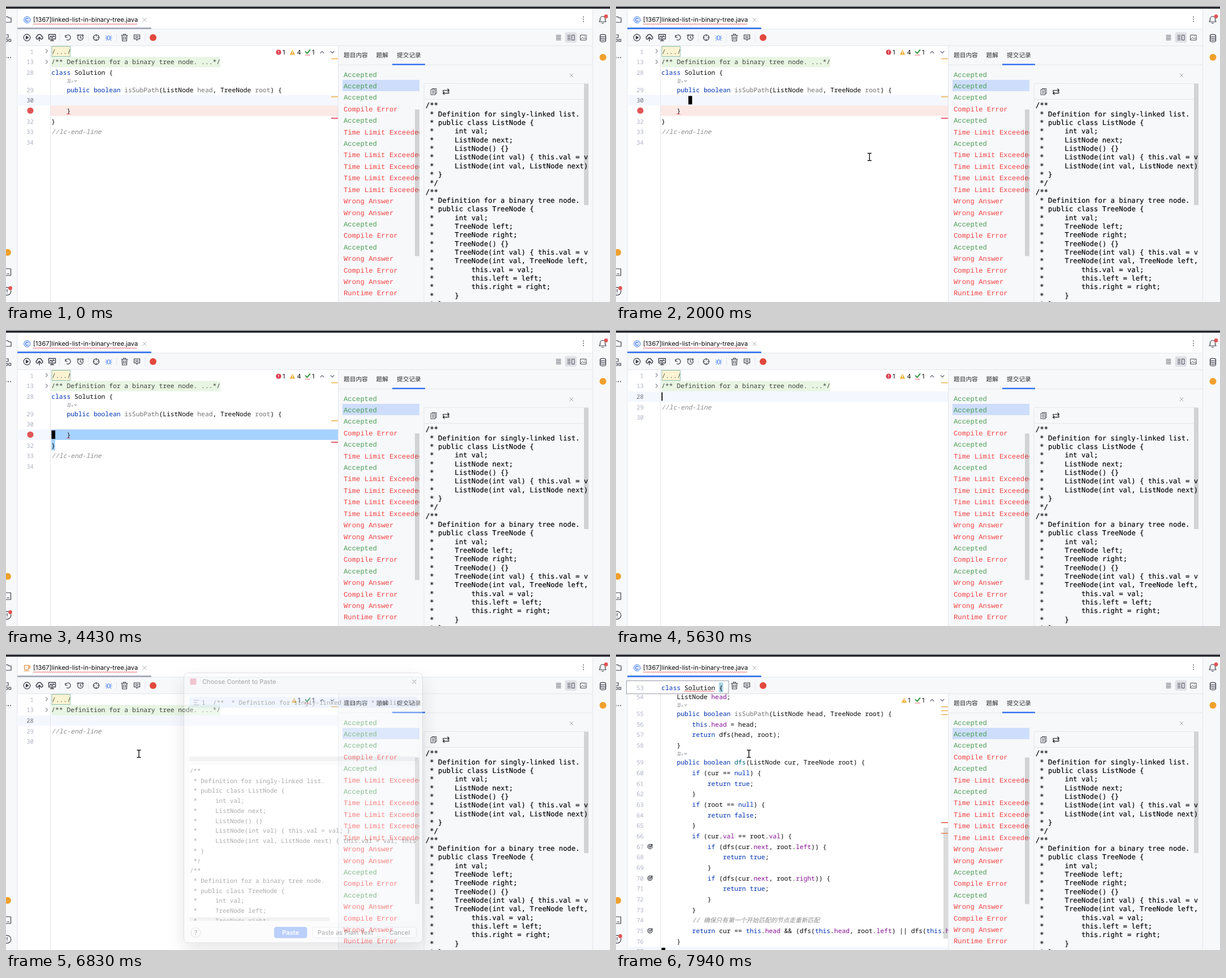
Recreate the animation shown at these times as an HTML page. Size 1068 px wide and 525 px high, loop 8 s.

```html
<!DOCTYPE html>
<html lang="en">
<head>
<meta charset="utf-8">
<title>Pasting a solution in the editor</title>
<style>
  html, body { margin: 0; width: 100%; height: 100%; overflow: hidden; background: #fff; }
  svg { display: block; width: 1068px; height: 525px; }
  text { white-space: pre; text-rendering: geometricPrecision; fill: #080808; }
  .ui { font: 11.1px Inter, "Noto Sans CJK SC", sans-serif; }
  .zh { font: 10.7px "Noto Sans CJK SC", "Noto Sans CJK", sans-serif; }
  .thin { font-weight: 300; fill: #2a2a2a; }
  .ed text { font: 11.32px "Noto Sans Mono", "Noto Sans CJK SC", monospace; }
  .ed .num { font-size: 10.7px; fill: #aeb3c2; text-anchor: end; }
  .ed .current { fill: #6f7382; }
  .ed .kw { fill: #0033b3; }
  .ed .com { fill: #8c8c8c; font-style: italic; }
  .ed .field { fill: #871094; }
  .ed .fn { fill: #00627a; }
  .ed .dim, .before .param { fill: #737373; }
  .cjk { font-size: 10.8px; }
  .sub text { font: 12.25px "DejaVu Sans Mono", monospace; fill: #000; stroke: #000; stroke-width: .15px; }
  .list text { font: 12.28px "Liberation Mono", monospace; fill-opacity: .88; }
  .clip text { font: 10.75px "Noto Sans Mono", monospace; }
  .ic { fill: none; stroke: #3c3f49; stroke-width: 1.2; stroke-linejoin: round; stroke-linecap: round; }
  .rule { stroke: #e4e6eb; stroke-width: 1; }
  .wave { fill: none; stroke: #e5484d; stroke-width: .9; }
  .sel { fill: #a6d2ff; }
</style>
</head>
<body>
<svg id="stage" viewBox="0 0 1068 525"></svg>
<script>
const LOOP = 8000, COL = 6.79, ROW = 18.67, INLAY = 11.6, SCROLL = 527.7;
const LIST_CLASS = `/**
 * Definition for singly-linked list.
 * public class ListNode {
 *     int val;
 *     ListNode next;
 *     ListNode() {}
 *     ListNode(int val) { this.val = val; }
 *     ListNode(int val, ListNode next) { this.val = val; this.next = next; }
 * }
 */
/**
 * Definition for a binary tree node.
 * public class TreeNode {
 *     int val;
 *     TreeNode left;
 *     TreeNode right;
 *     TreeNode() {}
 *     TreeNode(int val) { this.val = val; }
 *     TreeNode(int val, TreeNode left, TreeNode right) {
 *         this.val = val;
 *         this.left = left;
 *         this.right = right;
 *     }
 * }
 */`.split("\n");
const SOLUTION = `class Solution {
    ListNode head;
    public boolean isSubPath(ListNode head, TreeNode root) {
        this.head = head;
        return dfs(head, root);
    }
    public boolean dfs(ListNode cur, TreeNode root) {
        if (cur == null) {
            return true;
        }
        if (root == null) {
            return false;
        }
        if (cur.val == root.val) {
            if (dfs(cur.next, root.left)) {
                return true;
            }
            if (dfs(cur.next, root.right)) {
                return true;
            }
        }
        // 确保只有第一个开始匹配的节点走重新匹配
        return cur == this.head && (dfs(this.head, root.left) || dfs(this.head, root.right));
    }
}
//lc-end-line`.split("\n");

const TOKEN = new RegExp([
  "(?<com>//.*|^ ?/?\\*.*)",
  "\\b(?<kw>class|public|boolean|return|if|null|true|false|this)\\b",
  "(?<field>(?<=\\.)(?:val|next|left|right|head)\\b|(?<=ListNode )head(?=;))",
  "(?<fn>(?<=boolean )dfs)",
  "(?<dim>isSubPath)",
  "(?<param>(?<=Node )(?:head|root)(?=[,)]))"
].join("|"), "g");

const esc = s => s.replace(/&/g, "&amp;").replace(/</g, "&lt;");
const rect = (x, y, w, h, fill, more = "") =>
  `<rect x="${x}" y="${y}" width="${w}" height="${h}" fill="${fill}" ${more}/>`;
const dot = (x, y, r, fill) => `<circle cx="${x}" cy="${y}" r="${r}" fill="${fill}"/>`;
const rule = (x1, y1, x2, y2) => `<path class="rule" d="M${x1} ${y1}L${x2} ${y2}"/>`;
const icon = (x, y, d, more = "") => `<path class="ic" transform="translate(${x} ${y})" d="${d}" ${more}/>`;
const label = (x, y, s, cls = "ui", more = "") => `<text class="${cls}" x="${x}" y="${y}" ${more}>${esc(s)}</text>`;
const during = (spans, body) => `<g data-on="${spans}">${body}</g>`;
const ring = r => `M${-r} 0a${r} ${r} 0 1 0 ${2 * r} 0a${r} ${r} 0 1 0 ${-2 * r} 0`;
const CROSS = "M-3 -3L3 3M3 -3L-3 3";

function wave(x1, x2, y) {
  let d = `M${x1} ${y}`;
  for (let x = x1 + 1.7, i = 0; x <= x2; x += 1.7, i++) d += `L${x.toFixed(1)} ${y + (i % 2 ? 0 : -1.8)}`;
  return `<path class="wave" d="${d}"/>`;
}

// One line of code: every word sits on its own column.
function code(s, x, y, col = COL) {
  let out = "", last = 0;
  const put = (part, at, cls) => {
    for (const m of part.matchAll(/\S+/g)) {
      const c = /[一-龥]/.test(m[0]) ? cls + " cjk" : cls;
      out += `<tspan x="${(x + (at + m.index) * col).toFixed(2)}" class="${c}">${esc(m[0])}</tspan>`;
    }
  };
  for (const m of s.matchAll(TOKEN)) {
    put(s.slice(last, m.index), last, "");
    put(m[0], m.index, Object.keys(m.groups).find(k => m.groups[k]));
    last = m.index + m[0].length;
  }
  put(s.slice(last), last, "");
  return `<text y="${y.toFixed(2)}">${out}</text>`;
}
const num = (n, y) => `<text class="num" x="49" y="${y + 4}" data-row="${y}">${n}</text>`;
const row = (n, s, y) => num(n, y) + code(s, 80.3, y + 4);
const inlay = y => icon(113, y, "M-4 -2H1M-2 -4L-3 3M1 -3L-1 4M-5 2H1M3 1H5M4 0V3", 'style="stroke:#a3a6ad;stroke-width:.9"') +
  icon(123, y, "M-2 -1L0 1L2 -1", 'style="stroke:#a3a6ad"');

function header() {
  return rect(81, 71.5, 32.5, 18, "#fbf3d2", 'stroke="#8dbdae"') + rect(80, 90.3, 299, 18.4, "#e8f5e3") +
    num(1, 80.5) + num(13, 99.3) +
    `<text x="81" y="84.5" style="fill:#555a50">/.../</text>` +
    `<g style="opacity:.75">${"/** Definition for a binary tree node. ...*/".split(" ").reduce(([o, c], w) =>
      [o + `<text x="${80.3 + c * COL}" y="103.3">${w}</text>`, c + w.length + 1], ["", 0])[0]}</g>` +
    [80, 99].map(y => icon(72, y, "M-1.5 -3L1.5 0L-1.5 3", 'style="stroke:#8b8f99"')).join("");
}

function before() {
  const rows = [[28, SOLUTION[0], 118], [29, SOLUTION[2], 148.5], [30, "", 167.3], [0, "    }", 185.8],
    [32, "}", 204.5], [33, "//lc-end-line", 223.3], [34, "", 242]];
  const sel = (t, y, h, w = 507) => during(`${t} 5630`, `<rect class="sel" x="80" y="${y}" width="${w}" height="${h}"/>`);
  const match = (t, x, y) => during(t, rect(x, y, 7, 17, "#a9d4ea"));
  return rect(78, 176.4, 509, 18.6, "#fbe9e6") +
    sel(4320, 195, 18.6, 7) + sel(4430, 176.4, 18.6) + sel(4620, 157.8, 18.6) + sel(4720, 127.3, 30.5) + sel(4930, 108.7, 18.6) +
    match("3620 3720", 481, 140) + match("3720 4430", 182, 109.5) +
    `<g class="before">${rows.map(([n, s, y]) => n ? row(n, s, y) : code(s, 80.3, y + 4)).join("")}</g>` +
    dot(43, 185.5, 5.6, "#e05555") + wave(107, 115, 192.5) + inlay(133);
}

function pasted() {
  let out = "";
  const lines = LIST_CLASS.concat(SOLUTION);
  lines.forEach((s, i) => {
    const n = i + 28, y = 118 + i * ROW + (n > 54) * INLAY + (n > 58) * INLAY;
    if (n == 55 || n == 59) out += inlay(y - 15.3);
    out += row(n, s, +y.toFixed(2));
    if ([67, 70, 75].includes(n)) out += during("7940 8000",
      icon(60, y, "M3.8 -1.5A4 4 0 1 1 1 -3.9M1.5 0A1.5 1.5 0 1 1 -1.5 0A1.5 1.5 0 0 1 1.5 0L4 -4M1.6 -4H4V-1.6"));
  });
  return out;
}

function editor() {
  const mark = (y, c) => rect(575, y - .8, 12, 1.7, c), amber = "#f0b95a";
  return `<g clip-path="url(#edClip)" class="ed">
    <g id="doc">
      <rect id="now" x="20" width="567" height="18.6" fill="#f4f7fe"/>
      ${header()}
      ${during("0 5630", before())}
      ${during("5630 7350", num(28, 118) + row(29, "//lc-end-line", 136.7) + num(30, 155.4))}
      ${during("7350 8000", pasted())}
      <rect id="caret" height="15" fill="#000"/>
    </g>
    ${rule(78.5, 70, 78.5, 525)}
    ${during("7350 8000", rect(579, 308, 8, 197, "#000", 'opacity=".14"'))}
    ${mark(93.5, amber)}
    ${during("0 5630", mark(161, amber) + mark(199, "#e0465a"))}
    ${during("7640 8000", mark(100.5, amber) + mark(107.5, amber) + mark(299, "#e0664a") + mark(318, "#e88f5c"))}
  </g>` + checks();
}

function checks() {
  const warn = x => `<path d="M${x} 77.5L${x + 4.8} 86.5H${x - 4.8}Z" fill="#f2b23e"/>` + rect(x - .5, 80, 1.1, 3.4, "#fff") + rect(x - .5, 84.2, 1.1, 1.1, "#fff");
  const soft = 'style="stroke:#6c707e"';
  return during("0 6030", dot(482, 82, 4.6, "#db3b4b") + rect(481.4, 79.3, 1.2, 3.3, "#fff") + rect(481.4, 83.5, 1.2, 1.2, "#fff") +
      label(489, 86, "1") + warn(506.5) + label(514.5, 86, "4")) +
    during("6030 8000", warn(509.5) + label(516, 86, "1")) +
    icon(533.5, 81, "M-4 0L-1 3L4 -3", 'style="stroke:#3b9a4b;stroke-width:2"') + wave(529, 539, 88) + label(541, 86, "1") +
    icon(559, 82, "M-3 1.5L0 -1.5L3 1.5", soft) + icon(577, 82, "M-3 -1.5L0 1.5L3 -1.5", soft);
}

function chrome() {
  const undo = "M-4 -4V-.5H-.5M-4 -1A4.6 4.6 0 1 1 -1.5 4";
  const file = "[1367]linked-list-in-binary-tree.java";
  return rect(0, 0, 1068, 525, "#fff") + rect(0, 41, 1038, 29, "#f7f8fa") + rect(0, 5, 20, 520, "#f7f8fa") +
    rect(1037, 5, 31, 520, "#f7f8fa") + rect(588, 70, 449, 455, "#f7f8fa") +
    rect(0, 0, 1068, 1, "#e9eaec") + rect(0, 1, 1068, 3.8, "#26282e") +
    rule(20, 41, 1037, 41) + rule(20, 70.5, 1037, 70.5) + rule(20, 5, 20, 525) + rule(1037.5, 5, 1037.5, 525) + rule(587.5, 70, 587.5, 525) +
    `<rect id="tabLine" x="20" y="38.3" width="237" height="2.8" rx="1.2"/>` +
    during("0 5830 7640 8000", `<circle cx="37.3" cy="24.5" r="5.6" fill="#e7effd" stroke="#3574f0"/>` +
      icon(37.3, 24.5, "M2 -1.8A2.7 2.7 0 1 0 2 1.8", 'style="stroke:#3574f0"')) +
    during("5830 7640", icon(37, 24, "M-4.5 -4H3V2A2 2 0 0 1 1 4H-2.5A2 2 0 0 1 -4.5 2ZM3 -3H5.5V1H3M-5 6H4", 'style="stroke:#e08a3c;fill:#fff3e6"')) +
    label(48, 28.3, file) + wave(48, 233, 33) + icon(245, 24.5, CROSS, 'style="stroke:#9a9da6;stroke-width:.9"') +
    [19.5, 23.5, 27.5].map(y => dot(1021, y, 1, "#5a5d66")).join("") +
    icon(37, 56, ring(5.8)) + icon(37, 56, "M-1.5 -2.6L2.6 0L-1.5 2.6Z", 'style="fill:#3c3f49"') +
    icon(59, 56, "M-3 3H-4A3 3 0 0 1 -4 -2.5A4.2 4.2 0 0 1 4 -2.5A2.9 2.9 0 0 1 4 3H3M0 6V-.5M-2.2 1.6L0 -.6L2.2 1.6", 'style="stroke-width:1.5"') +
    icon(81.5, 55.5, "M-6 -5H6V3H-6ZM-3 6H3M0 3V6M-4 0L-2 -2L0 .5L2 -2.5L4 -1", 'style="stroke-width:1.4"') +
    icon(109, 56, undo) + icon(131.5, 56, ring(4.8) + "M0 -2.8V.3L2 1.5M-5.5 -3.5L-3.5 -5.5M5.5 -3.5L3.5 -5.5") +
    icon(159.5, 56, ring(5) + "M0 -5.5V-2.5M0 5.5V2.5M-5.5 0H-2.5M5.5 0H2.5") +
    icon(181.5, 56, "M-2.3 -1A2.3 2.3 0 0 1 2.3 -1V2A2.3 2.3 0 0 1 -2.3 2ZM-2.5 -1L-5 -3M2.5 -1L5 -3M-2.5 1H-5.5M2.5 1H5.5M-2.5 3L-4.5 5M2.5 3L4.5 5", 'style="stroke:#3574f0;stroke-width:.95"') +
    icon(209.5, 56, "M-5.5 -4H5.5M-2 -4V-6H2V-4M-4.3 -4L-3.8 6H3.8L4.3 -4M-1.5 -1.5V3.5M1.5 -1.5V3.5") +
    icon(231.5, 55.5, "M-5 -4.5H5V3H1.5L0 5.5L-1.5 3H-5ZM-2.5 -2H2.5M-2.5 .6H2.5") +
    dot(260, 56, 6, "#e2483d") +
    [95, 145.5, 195.5, 246].map(x => rule(x, 49, x, 63)).join("") +
    rect(988.5, 46.5, 20.5, 18.5, "#dfe1e6", 'rx="3"') +
    icon(977, 56, "M-4 -4H4M-4 -1.3H4M-4 1.4H4M-4 4H4", 'style="stroke-width:.9"') +
    icon(999, 56, "M-6 -4H-1M-6 -1.3H-1M-6 1.4H-1M-6 4H-1M2 -4.5H6V4.5H2Z", 'style="stroke-width:.9"') +
    icon(1021, 56, "M-5 -4.5H5V4.5H-5ZM-5 3L-1.5 0L1 2L3 .5L5 2.5M1.5 -2.2H2.2", 'style="stroke-width:.9"') +
    strips();
}

function strips() {
  return icon(1055, 24, "M-6 4H6L4.5 1.5V-1A4.5 4.5 0 0 0 -4.5 -1V1.5ZM-1.5 6.5H1.5") + dot(1061, 18.5, 3.4, "#e05555") +
    icon(1055.5, 57, "M-5 -4.5A5 2.2 0 1 1 5 -4.5A5 2.2 0 1 1 -5 -4.5V4.5A5 2.2 0 0 0 5 4.5V-4.5M-5 -1.5A5 2.2 0 0 0 5 -1.5M-5 1.5A5 2.2 0 0 0 5 1.5") +
    dot(1055.5, 91, 6, "#f0a02c") +
    icon(4, 24, "M-6 -5H-1L1 -3H5V5H-6Z") + icon(3, 57, "M-5 -6H1V-1H-5ZM-5 2H-.5V6H-5ZM2 2H5.5V6H2Z") +
    [0, 4, 8].map(x => dot(x, 91.5, 1.1, "#5a5d66")).join("") + dot(3, 437, 6, "#f0a02c") +
    icon(2, 472, "M-7 -6H6.5V6H-7ZM0 3H3.5") + icon(2, 506, ring(6.8) + "M0 -3.5V1M0 3.3V3.5") +
    during("0 5630 7640 8000", dot(7.5, 500.5, 3.4, "#e05555"));
}

function panel() {
  const A = "Accepted", C = "Compile Error", T = "Time Limit Exceeded", W = "Wrong Answer", R = "Runtime Error";
  const runs = [A, A, A, C, A, T, A, T, T, T, T, W, W, A, C, A, W, C, W, R];
  return label(597, 90.8, "题目内容", "zh thin") + label(654.5, 90.8, "题解", "zh thin") + label(691, 90.8, "提交记录", "zh thin") +
    rule(588, 104.5, 1037, 104.5) + rect(683, 102.5, 58, 2.5, "#3574f0") +
    rect(595, 131, 136, 20, "#cdddfb") +
    `<g class="list" clip-path="url(#runClip)">${runs.map((s, i) =>
      `<text x="597" y="${125.5 + i * 20.42}" style="fill:${s == A ? "#35923f" : "#f42a2a"}">${s}</text>`).join("")}</g>` +
    rect(723, 183.5, 8, 260, "#000", 'opacity=".15"') +
    icon(1000, 123, CROSS, 'style="stroke:#8d919b;stroke-width:.8"') +
    `<path class="rule" fill="none" d="M739 525V137.5H1030M739 165.5H1022"/>` +
    during("980 1900", rect(747, 142.5, 19, 18.5, "#dfe1e6", 'rx="3"')) +
    icon(756, 152, "M-2.5 -4.5V-5.5H5V3.5H3.5M-4.5 -4H3V5.5H-4.5ZM-2.5 -1.3H1M-2.5 .8H1M-2.5 3H1", 'style="stroke-width:.9"') +
    icon(778, 152, "M-5 0V-2.5H5M3 -5L5.5 -2.5L3 0M5 0V2.7H-5M-3 .3L-5.5 2.7L-3 5.2", 'style="stroke:#222"') +
    `<g class="sub" clip-path="url(#subClip)">${LIST_CLASS.map((s, i) => code(s, 742, 180.3 + i * 15.33, 7.36)).join("")}</g>` +
    rect(1022, 138, 8, 215, "#000", 'opacity=".15"');
}

function message() {
  return `<g id="message"><g style="filter:drop-shadow(0 20px 18px rgba(0,0,0,.4))">${rect(417.5, 223.5, 222, 100.5, "#f7f8fa", 'rx="7" stroke="#8e939c"')}</g>
    <path d="M418 248V231A7 7 0 0 1 425 224H632A7 7 0 0 1 639 231V248Z" fill="#edf4fb"/>` +
    label(424, 239.5, "消息", "zh") + icon(625.5, 235.5, "M-4 -4L4 4M4 -4L-4 4", 'style="stroke:#222"') +
    dot(440, 270, 12, "url(#info)") + rect(438.7, 263, 2.6, 8, "#fff", 'rx="1"') + dot(440, 275, 1.6, "#fff") +
    label(467, 273, "复制成功!", "zh thin") +
    rect(497.5, 290.5, 63, 22.5, "#fff", 'rx="4" stroke="#3574f0" stroke-width="1.8"') + rect(499.3, 292.3, 59.4, 18.9, "#3574f0", 'rx="2.5"') +
    label(529, 306, "确定", "zh", 'text-anchor="middle" style="fill:#fff"') + `</g>`;
}

function paster() {
  const button = (x, w, s, main) => rect(x, 484.5, w, 19, main ? "#3574f0" : "#fff", `rx="3.5" stroke="${main ? "#3574f0" : "#c9ccd6"}"`) +
    label(x + w / 2, 498, s, "ui", `text-anchor="middle" style="${main ? "fill:#fff;font-weight:600" : ""}"`);
  return `<g id="paster"><g style="filter:drop-shadow(0 12px 16px rgba(0,0,0,.3))">${rect(314.5, 33.5, 422, 478.5, "#f7f8fa", 'rx="8" stroke="#a5a9b3"')}</g>` +
    rect(325.5, 43.5, 11, 11, "#e0607a") + label(347, 53, "Choose Content to Paste") + icon(722, 49, CROSS) +
    rect(324, 76, 403, 106, "#fff") + rect(324, 76, 403, 19.5, "#d4e2ff") + icon(336.5, 86, "M-4 -4H4M-4 0H1M-4 4H4") +
    rect(324, 182, 403, 8, "#dcdde1") + rect(324, 198, 403, 276, "#fff") +
    `<g class="clip" clip-path="url(#pasteClip)"><text x="346" y="90">1</text>` +
    code(LIST_CLASS.slice(0, 5).join(" "), 366, 90, 6.5) +
    LIST_CLASS.map((s, i) => code(s, 325, 211 + i * 17.73, 6.45)).join("") + `</g>` +
    rect(324, 467, 249, 6.5, "#000", 'opacity=".14"') +
    icon(335.5, 494, ring(8.5), 'style="stroke:#b5b8c2"') + label(335.5, 498, "?", "ui", 'text-anchor="middle"') +
    button(474.5, 57.5, "Paste", true) + button(542.5, 115, "Paste as Plain Text") + button(666, 60, "Cancel") + `</g>`;
}

const hint = () => during("7940 8000", `<g class="ed">` + rect(18.5, 47.5, 180.5, 23, "#fff", 'stroke="#9a9ea8"') +
  rect(182, 50.5, 7.5, 17.5, "#a9d4ea") + row(53, SOLUTION[0], 59.5) + wave(121, 175, 67) + `</g>`);

const clip = (id, x, y, w, h) => `<clipPath id="${id}">${rect(x, y, w, h, "#000")}</clipPath>`;
const stage = document.getElementById("stage");
stage.innerHTML = `<defs>${clip("edClip", 20, 70, 567.5, 455)}${clip("runClip", 588, 110, 143, 415)}
  ${clip("subClip", 739, 166, 290, 359)}${clip("pasteClip", 324, 76, 400, 397)}
  <linearGradient id="info" x1="0" y1="0" x2="1" y2="1"><stop offset="0" stop-color="#2fc0c8"/><stop offset="1" stop-color="#3a55f0"/></linearGradient></defs>` +
  chrome() + panel() + editor() + hint() + message() + paster() +
  `<path id="arrow" d="M0 0V13.5L3.1 10.6L5.3 15.4L7.6 14.4L5.5 9.7H9.8Z" fill="#fff" stroke="#222" stroke-width="1"/>
   <g id="beam"><path d="M-3.5 -6.5H-1Q0 -6.5 0 -5.5Q0 -6.5 1 -6.5H3.5M0 -6V6M-3.5 6.5H-1Q0 6.5 0 5.5Q0 6.5 1 6.5H3.5" fill="none" stroke="#111" stroke-width="1.4"/></g>`;

const $ = id => document.getElementById(id);
const timed = [...stage.querySelectorAll("[data-on]")].map(el => [el, el.dataset.on.split(" ").map(Number)]);
const numbers = [...stage.querySelectorAll("#doc .num")];
const within = (t, spans) => spans.some((a, i) => i % 2 == 0 && t >= a && t < spans[i + 1]);
const ramp = (t, a, b) => Math.min(1, Math.max(0, (t - a) / (b - a)));
const ease = p => p * p * (3 - 2 * p);

// time, x, y
const MOUSE = [[100, 990, 505], [520, 729, 200], [790, 753, 149], [1180, 753, 149], [1310, 729, 184], [1390, 724, 188],
  [1700, 529, 302], [1850, 529, 302], [2400, 235, 177]];
// time, x, row centre, width (0 hides the caret)
const CARET = [[0, 128, 167, 0], [2000, 128, 167, 6.6], [2500, 128, 167, 0], [3000, 128, 167, 6.6], [3520, 107.5, 185.7, 6.6],
  [3720, 80.5, 204.4, 6.6], [4430, 80.5, 185.7, 6.6], [4620, 80.5, 167, 6.6], [4720, 80.5, 148.5, 6.6], [4930, 80.5, 118, 6.6],
  [5630, 80.5, 118, 1.8], [6230, 80.5, 118, 0], [7150, 80.5, 118, 1.8], [7350, 80.5, 1056.3, 6.6]];

function mouseAt(t) {
  const i = MOUSE.findIndex(m => m[0] > t);
  if (i < 0) return MOUSE.at(-1).slice(1);
  if (i == 0) return MOUSE[0].slice(1);
  const [a, b] = [MOUSE[i - 1], MOUSE[i]], p = ramp(t, a[0], b[0]);
  return [a[1] + (b[1] - a[1]) * p, a[2] + (b[2] - a[2]) * p];
}
const show = (el, on) => { el.style.display = on ? "" : "none"; };

function draw(t) {
  for (const [el, spans] of timed) show(el, within(t, spans));

  const [, x, y, w] = CARET.findLast(c => c[0] <= t);
  const caret = $("caret");
  caret.setAttribute("x", x);
  caret.setAttribute("y", y - 7.5);
  caret.setAttribute("width", w);
  $("now").setAttribute("y", y - 9.3);
  for (const el of numbers) el.classList.toggle("current", Math.abs(el.dataset.row - y) < 5);
  $("doc").setAttribute("transform", `translate(0 ${-SCROLL * ease(ramp(t, 7330, 7740))})`);
  $("tabLine").setAttribute("fill", within(t, [2000, 6230, 7030, LOOP]) ? "#3574f0" : "#a3a9ba");

  const grow = ramp(t, 940, 1160), fade = grow * (1 - ramp(t, 1780, 1960)), k = .92 + .08 * ease(fade);
  show($("message"), fade > 0);
  $("message").style.opacity = fade;
  $("message").setAttribute("transform", `translate(528.5 273.5) scale(${k}) translate(-528.5 -273.5)`);

  const seen = ramp(t, 6200, 6500) * (1 - ramp(t, 6745, 6875));
  show($("paster"), seen > 0);
  $("paster").style.opacity = seen;

  const at = `translate(${mouseAt(t).join(" ")})`;
  show($("arrow"), within(t, [100, 2000]));
  show($("beam"), within(t, [2000, 3520, 6230, LOOP]));
  $("arrow").setAttribute("transform", at);
  $("beam").setAttribute("transform", at);
}

const start = performance.now();
function tick(now) {
  draw(Math.max(0, now - start) % LOOP);
  requestAnimationFrame(tick);
}
draw(0);
requestAnimationFrame(tick);
</script>
</body>
</html>
```
